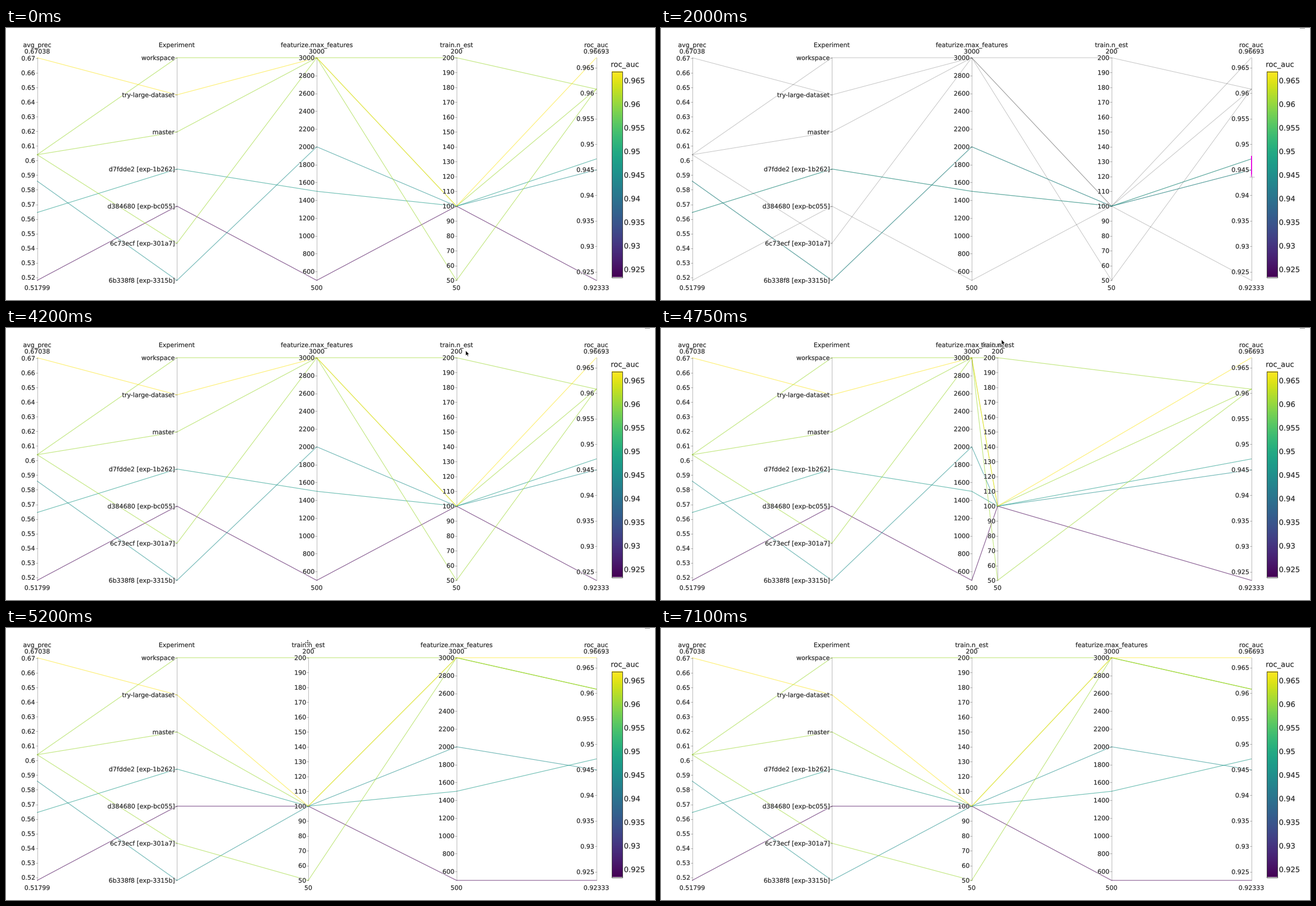
Animation, 1155 px wide and 485 px high, one loop 7.35 s. Source, as a matplotlib script:

```python
import matplotlib
import matplotlib.pyplot as plt
import numpy as np
from matplotlib.animation import FuncAnimation
from matplotlib.patches import PathPatch, Polygon, Rectangle
from matplotlib.path import Path
from matplotlib.textpath import TextPath
from matplotlib.transforms import Affine2D

W, H, DPI = 1155, 485, 64  # a power of two keeps the size exact
PX = 72 / DPI  # one pixel in points
STEP, FRAMES = 50, 147
TOP, BOTTOM = 53, 450
SLOTS = [55.5 + 248.75 * i for i in range(5)]
INK = "#262626"
VIRIDIS = matplotlib.colormaps["viridis"]

fig = plt.figure(figsize=(W / DPI, H / DPI), dpi=DPI, facecolor="white")
ax = fig.add_axes([0, 0, 1, 1])
ax.axis("off")


def glyphs(text, x, y, size, align="center"):
    """Outline of a text whose middle line lies at y."""
    path = TextPath((0, 0), text, size=size, prop={"family": "DejaVu Sans"})
    box = path.get_extents()
    anchor = {"left": box.x0, "right": box.x1, "center": (box.x0 + box.x1) / 2}[align]
    move = Affine2D().translate(-anchor, -0.365 * size).scale(1, -1).translate(x, y)
    return path.transformed(move)


def add_text(paths, halo=False):
    path = Path.make_compound_path(*paths)
    patches = []
    if halo:
        patches.append(PathPatch(path, fc="white", ec="white", lw=2 * PX, alpha=0.7))
    patches.append(PathPatch(path, fc=INK, ec=INK, lw=0.2 * PX))
    for patch in patches:
        patch.set_zorder(4)
        ax.add_patch(patch)
    return patches


class Axis:
    """A vertical axis drawn around x = 0 and shifted into place."""

    def __init__(self, name, lo, hi, ticks, names=None):
        self.lo, self.hi = lo, hi
        spots = [self.y(v) for v in ticks]
        labels = names or [f"{v:g}" for v in ticks]
        paths = [glyphs(s, -4.5, y, 11.1, "right") for s, y in zip(labels, spots)]
        paths.append(glyphs(name, 0, 30, 11.1))
        if names is None:
            paths.append(glyphs(f"{hi:g}", 0, 41.5, 11))
            paths.append(glyphs(f"{lo:g}", 0, 463, 11))
        style = dict(color="black", alpha=0.27, lw=PX, zorder=3)
        self.parts = ax.plot([0, 0], [TOP, BOTTOM], **style)
        tick_x = np.tile([-3, 0, np.nan], len(spots))
        self.parts += ax.plot(tick_x, np.repeat(spots, 3), **style)
        self.parts += add_text(paths, halo=True)

    def y(self, v):
        return BOTTOM - (v - self.lo) / (self.hi - self.lo) * (BOTTOM - TOP)

    def place(self, x):
        self.x = x
        for part in self.parts:
            part.set_transform(Affine2D().translate(x, 0) + ax.transData)


experiments = ["6b338f8 [exp-3315b]", "6c73ecf [exp-301a7]", "d384680 [exp-bc055]",
               "d7fdde2 [exp-1b262]", "master", "try-large-dataset", "workspace"]
prec = Axis("avg_prec", 0.51799, 0.67038, np.arange(52, 68) / 100)
exper = Axis("Experiment", 0, 6, range(7), experiments)
feat = Axis("featurize.max_features", 500, 3000, range(600, 3001, 200))
train = Axis("train.n_est", 50, 200, range(50, 201, 10))
roc = Axis("roc_auc", 0.92333, 0.96693, np.arange(925, 966, 5) / 1000)
axes = [prec, exper, feat, train, roc]

# avg_prec, experiment, max_features, n_est, roc_auc
runs = [
    (0.51799, 2, 500, 100, 0.92333),
    (0.58593, 0, 2000, 100, 0.94497),
    (0.56444, 3, 1500, 100, 0.94711),
    (0.604, 1, 3000, 50, 0.96078),
    (0.604, 4, 3000, 100, 0.96078),
    (0.604, 6, 3000, 200, 0.96078),
    (0.67038, 5, 3000, 100, 0.96693),
]
context, focus = [], []
for run in runs:
    shade = VIRIDIS((run[-1] - roc.lo) / (roc.hi - roc.lo))
    context += ax.plot([], [], color="black", alpha=0.23, lw=PX, zorder=1)
    focus += ax.plot([], [], color=shade, alpha=0.64, lw=1.15 * PX, zorder=2)

# colour bar
BAR = (1077.5, 1097, 444.5, 77.5)
ramp = VIRIDIS(np.linspace(1, 0, 367))[:, None, :]
ax.imshow(ramp, extent=BAR, aspect="auto", zorder=1)
ax.add_patch(Rectangle((BAR[0], BAR[3]), 19.5, 367, fc="none", ec="#444", lw=PX, zorder=2))
scale = [glyphs(f"{v:g}", 1100.5, np.interp(v, [roc.lo, roc.hi], BAR[2:]), 13.1, "left")
         for v in np.arange(925, 966, 5) / 1000]
add_text(scale + [glyphs("roc_auc", 1077.5, 64.5, 13.1, "left")])

toolbar = ax.add_patch(Rectangle((1137, 0), 9, 1, fc="#999", ec="none", zorder=2))
BRUSH_X, BRUSH_TOP = 1049.6, 228
brush = ax.add_patch(Rectangle((BRUSH_X, BRUSH_TOP), 2.3, 0, fc="#e612e0", ec="none", zorder=5))


def star(arm):
    """Repeat one arm in four quarter turns."""
    points = []
    for _ in range(4):
        points += arm
        arm = [(-y, x) for x, y in arm]
    return points


shapes = {
    "arrow": [(0, 0), (0, 9.5), (2.2, 7.6), (3.7, 11), (5.2, 10.3), (3.8, 7.1), (6.6, 7)],
    "cross": star([(-0.5, -0.5), (-0.5, -4.5), (0.5, -4.5)]),
    "move": star([(-0.7, -0.7), (-0.7, -3), (-2, -3), (0, -5.2), (2, -3), (0.7, -3)]),
}
cursors = {kind: ax.add_patch(Polygon(points, fc="black", ec="white", lw=0.7 * PX, zorder=6))
           for kind, points in shapes.items()}
cursors["cross"].set(fc="#333", alpha=0.9)

ax.set_xlim(0, W)
ax.set_ylim(H, 0)

# pointer path: time, x, y
pointer = np.array([
    (250, 600, -14), (400, 690, 30), (650, 960, 180), (850, 1051, 228),
    (1000, 1051, 228), (1050, 1051, 229), (1100, 1051, 234), (1150, 1051, 244),
    (1200, 1051, 254), (1300, 1051, 262), (1500, 1051, 265.5), (2650, 1051, 265.5),
    (2850, 1052, 251), (3500, 1052, 251), (3650, 1010, 225), (4000, 860, 85),
    (4150, 822, 52), (4200, 818, 40), (4300, 809, 22), (4900, 570, 20),
    (5200, 537, 26), (5450, 537, 26), (5600, 560, 60), (5900, 620, 112),
    (6550, 620, 112), (6600, 620, 121), (6700, 620, 121), (7050, 760, -16),
]).T
# dragged axis: time, x
drag = np.array([
    (4300, 801.75), (4400, 788), (4500, 738), (4600, 673), (4700, 618), (4800, 580),
    (4900, 563), (4950, 552), (5050, 543), (5200, 538),
]).T
kinds = [(900, "arrow"), (2650, "cross"), (3550, "move"), (4950, "arrow"),
         (5500, "move"), (7351, "arrow")]
DRAG_START, DRAG_END = 4300, 5450


def pointer_at(t):
    x, y = (np.interp(t, pointer[0], row) for row in pointer[1:])
    if DRAG_START <= t < DRAG_END:
        x = np.interp(t, *drag) + np.interp(t, [4900, 5200], [7, -1])
    return x, y


def update(i):
    t = i * STEP

    # axes
    for axis, x in zip(axes, SLOTS):
        axis.place(x)
    x = np.interp(t, *drag) if t < DRAG_END else SLOTS[2]
    if t < DRAG_START:
        x = SLOTS[3]
    swapped = x <= SLOTS[2]
    feat.place(SLOTS[3] if swapped else SLOTS[2])
    train.place(x)
    order = np.argsort([axis.x for axis in axes])

    # brush, trailing the pointer a little
    brushing = 1050 <= t < 3500
    end = max(BRUSH_TOP + 1, pointer_at(min(t, 2600) - 100)[1])
    brush.set_height(end - BRUSH_TOP)
    brush.set_visible(brushing)

    # runs
    for run, back, front in zip(runs, context, focus):
        xs = [axes[k].x for k in order]
        ys = [axes[k].y(run[k]) for k in order]
        back.set_data(xs, ys)
        front.set_data(xs, ys)
        back.set_visible(brushing)
        front.set_visible(not brushing or BRUSH_TOP <= ys[-1] <= end)

    # pointer and toolbar
    current = next(kind for limit, kind in kinds if t < limit)
    shift = Affine2D().translate(*pointer_at(t)) + ax.transData
    for kind, patch in cursors.items():
        patch.set_visible(kind == current and 250 <= t < 7100)
        patch.set_transform(shift)
    toolbar.set_alpha(np.interp(t, [250, 400, 6850, 7100], [0, 1, 1, 0]))
    return []


anim = FuncAnimation(fig, update, frames=FRAMES, interval=STEP, repeat=True,
                     cache_frame_data=False)
plt.show()
```
